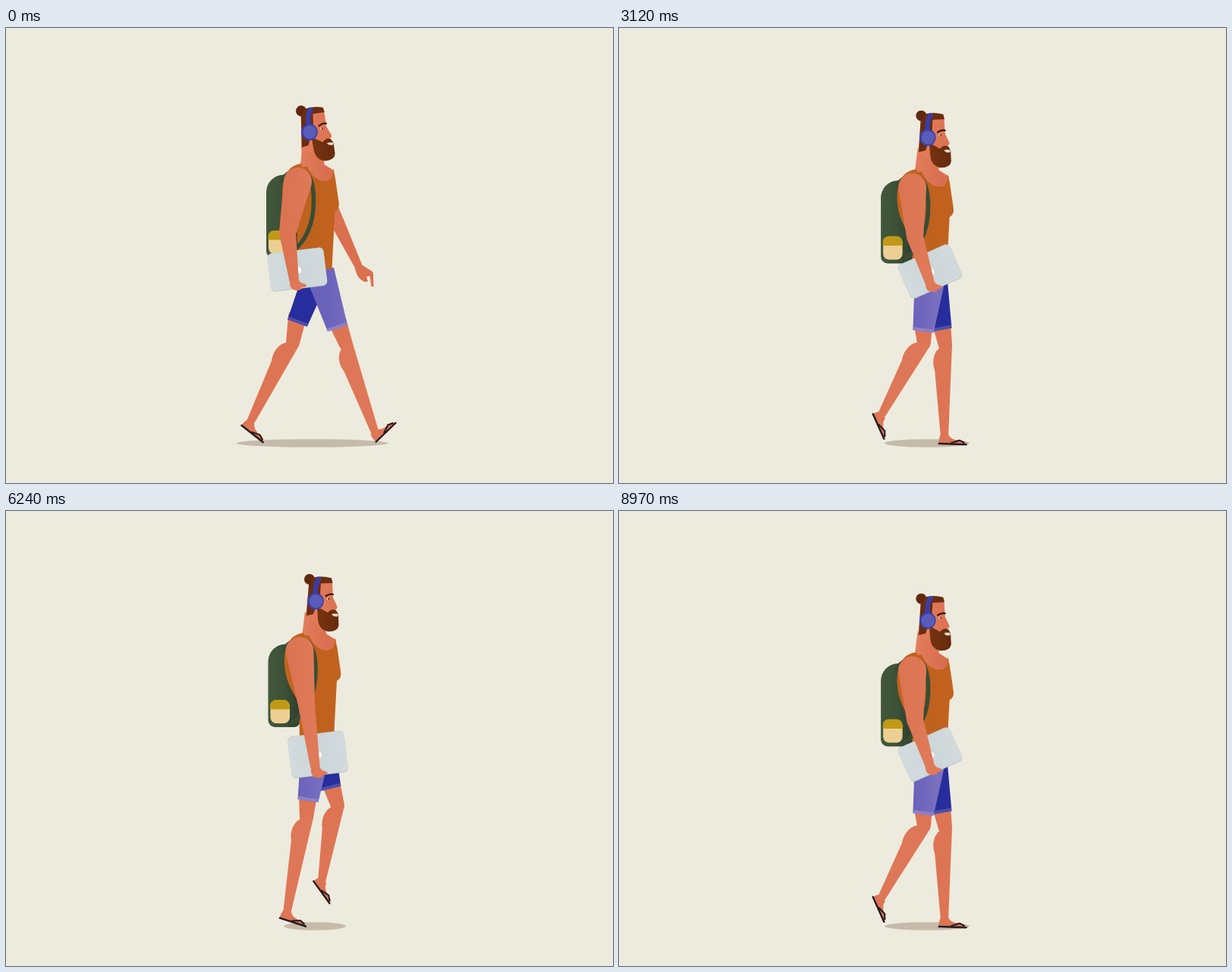
Write an HTML page with a canvas that moves like this. It is 800 px wide and 600 px high and loops after 9000 ms.

```html
<!DOCTYPE html>
<html lang="en">
<head>
<meta charset="utf-8">
<title>Walk cycle</title>
<style>
html, body { margin: 0; width: 100%; height: 100%; overflow: hidden; background: #edebde; }
canvas { display: block; width: 800px; height: 600px; }
</style>
</head>
<body>
<canvas id="stage" width="800" height="600"></canvas>
<script>
const ctx = document.getElementById('stage').getContext('2d');
const LOOP = 9000, FRAME = 30, CYCLE = 1170, STEP = CYCLE / 2;
const SKIN = '#dd7555', FAR_SKIN = '#da7050', HAIR = '#6a2d10', DARK = '#231b20';

// time, body drop, forward lean, shadow radius (repeats every step)
const BODY = [
  [0, 18, 0, 100],
  [180, 25.5, .85, 56],
  [210, 18.5, 1, 43],
  [300, 5, 1.02, 38],
  [390, 0, 1, 41],
  [458, 2, .65, 46],
  [510, 8.5, .3, 72]
];

// time, hem x y, knee x y, ankle x y, foot angle
const LEG = [
  [0, 437, 396, 448, 417, 487, 535, -44],
  [80, 435, 401, 445, 421, 461, 540, -5],
  [180, 425, 398, 430, 418, 429, 540, 2],
  [210, 420, 399, 427, 416, 423, 540, 2],
  [390, 398, 382, 396, 404, 370, 531, 18],
  [458, 394, 377, 388, 404, 353, 530, 23],
  [510, 389, 388, 382, 412, 339, 529, 27],
  [585, 384, 389, 378, 415, 321, 522, 38],
  [765, 401, 400, 402, 415, 345, 512, 66],
  [795, 405, 388, 409, 411, 355, 496, 78],
  [975, 428, 366, 437, 388, 416, 489, 54],
  [1043, 430, 373, 441, 393, 433, 500, 25],
  [1095, 432, 377, 443, 402, 451, 513, 0]
];

// time, elbow x y, wrist x y, laptop x y angle
const NEAR_ARM = [
  [0, 371, 270, 380, 335, 384, 318.5, -7],
  [210, 378, 272, 391, 336, 393, 320, -11],
  [390, 396, 255, 408, 341, 411, 321, -7],
  [510, 398, 265, 417, 340, 417.5, 320, -15],
  [585, 398, 273, 421, 338, 421, 319, -19],
  [765, 390, 275, 410, 337, 410, 321, -24],
  [1043, 384, 258, 385, 338, 390.5, 319, 0]
];

// time, elbow x y, wrist x y, hand angle
const FAR_ARM = [
  [0, 437, 257, 465, 315, 0],
  [210, 426, 275, 437, 318, 0],
  [390, 410, 255, 404, 316, 20],
  [510, 386, 268, 376, 331, 35],
  [585, 380, 278, 365, 330, 38],
  [765, 400, 280, 400, 316, 20],
  [1043, 434, 260, 451, 318, 15]
];

const rad = a => a * Math.PI / 180;

// Smooth periodic curve through timed rows
function sample(rows, period, time) {
  const n = rows.length, t = (time % period + period) % period;
  let i = n - 1;
  while (rows[i][0] > t) i--;
  const row = k => rows[(k + n) % n];
  const at = k => row(k)[0] + Math.floor(k / n) * period;
  const h = at(i + 1) - at(i), u = (t - at(i)) / h;
  const slope = (k, c) => {
    const a = at(k) - at(k - 1), b = at(k + 1) - at(k);
    const left = (row(k)[c] - row(k - 1)[c]) / a;
    const right = (row(k + 1)[c] - row(k)[c]) / b;
    return (left * b + right * a) / (a + b);
  };
  return row(i).slice(1).map((p, j) => {
    const q = row(i + 1)[j + 1];
    const m = slope(i, j + 1) * h, k = slope(i + 1, j + 1) * h;
    const u2 = u * u, u3 = u2 * u;
    return p * (2 * u3 - 3 * u2 + 1) + m * (u3 - 2 * u2 + u) + q * (3 * u2 - 2 * u3) + k * (u3 - u2);
  });
}

function fill(d, color) {
  ctx.fillStyle = color;
  ctx.fill(new Path2D(d));
}

function line(d, color, width) {
  ctx.strokeStyle = color;
  ctx.lineWidth = width;
  ctx.lineCap = ctx.lineJoin = 'round';
  ctx.stroke(new Path2D(d));
}

function oval(x, y, rx, ry, color) {
  ctx.fillStyle = color;
  ctx.beginPath();
  ctx.ellipse(x, y, rx, ry, 0, 0, 7);
  ctx.fill();
}

function box(x, y, w, h, r, color) {
  ctx.fillStyle = color;
  ctx.beginPath();
  ctx.roundRect(x, y, w, h, r);
  ctx.fill();
}

function blend(x0, x1, ...colors) {
  const g = ctx.createLinearGradient(x0, 0, x1, 0);
  colors.forEach((c, i) => g.addColorStop(i / (colors.length - 1), c));
  return g;
}

function placed(x, y, angle, draw) {
  ctx.save();
  ctx.translate(x, y);
  ctx.rotate(rad(angle));
  draw();
  ctx.restore();
}

// Round-ended limb that narrows from r0 to r1
function taper(x0, y0, r0, x1, y1, r1, color) {
  const dir = Math.atan2(y1 - y0, x1 - x0);
  const a = Math.acos((r0 - r1) / Math.hypot(x1 - x0, y1 - y0));
  ctx.fillStyle = color;
  ctx.beginPath();
  ctx.arc(x0, y0, r0, dir + a, dir - a + 2 * Math.PI);
  ctx.arc(x1, y1, r1, dir - a, dir + a);
  ctx.closePath();
  ctx.fill();
}

function foot(x, y, angle) {
  placed(x, y, angle, () => {
    fill('M-5 -4L5 -4Q8 2 17 3L26 4Q29 6 27 8L-7 8Q-8 2 -5 -4Z', SKIN);
    line('M9 7L20 3L26 6', DARK, 2);
    line('M-7 8.2L29 8.2', DARK, 2.4);
  });
}

function leg(time, isFar, dy) {
  let [hx, hy, kx, ky, ax, ay, turn] = sample(LEG, CYCLE, time);
  if (isFar) {
    const q = (time % CYCLE + CYCLE) % CYCLE;
    const kick = Math.exp(-(((q - 458) / 60) ** 2));
    ay -= 8 * kick;
    turn += 18 * kick;
  }
  foot(ax, ay, turn);
  taper(hx, hy - 8, 12, kx, ky, 9, SKIN);

  const len = Math.hypot(ax - kx, ay - ky);
  const shin = Math.atan2(ay - ky, ax - kx) * 180 / Math.PI;
  placed(kx, ky, shin, () => {
    fill(`M0 -9L${len} -5L${len + 3} 0L${len} 5L34 13.5C22 18 8 15 3 6L-3 0Z`,
      isFar ? SKIN : '#de7757');
  });

  const waist = 298 + dy, left = isFar ? 394 : 390;
  const d = Math.hypot(hx - 411, hy - waist);
  const ux = (hx - 411) / d, uy = (hy - waist) / d;
  const hem = (side, back) => `${hx + side * uy - back * ux} ${hy - side * ux - back * uy}`;
  const cloth = isFar ? '#272d9c' : blend(hx - 16, hx + 18, '#6a61ba', '#7067bd', '#7b70bf');
  fill(`M${left} ${waist}L432 ${waist}L${hem(13.7, 0)}L${hem(-13.7, 0)}Z`, cloth);
  fill(`M${hem(13.7, 0)}L${hem(-13.7, 0)}L${hem(-13.7, 4)}L${hem(13.7, 4)}Z`,
    isFar ? '#4c51ae' : '#8b82cb');
}

function farArm(time, dy) {
  const [ex, ey, wx, wy, turn] = sample(FAR_ARM, CYCLE, time);
  taper(412, 192 + dy, 14, ex, ey, 9, FAR_SKIN);
  taper(ex, ey, 9, wx, wy, 5, FAR_SKIN);
  placed(wx, wy, turn, () =>
    fill('M-5 -1L5 -2L16 5Q20 7 19 13L19.5 26L16.5 26L14.5 12L10 13L12 19Q7 21 3 17Q-2 13 -5 3Z', FAR_SKIN));
}

function backpack() {
  box(345.5, 175.5, 42, 109.5, [23, 12, 8, 9], blend(345, 388, '#42583c', '#3c5137', '#2d3d2d'));
  box(348.5, 249.5, 25.5, 30.5, 8, '#ecd093');
  box(348, 249, 26, 12.5, [8, 8, 1, 1], '#c09a17');
}

function torso() {
  fill('M394 133L421 150L422 162L435 170L432 190L400 190L390 166Z', blend(392, 424, '#e27c5b', '#d96f50'));
  fill('M391 161C375 163 366 177 367 202C368 222 376 237 386 252L387 300L432 300L436 224' +
    'Q443 220 441 211L436.5 180L433.5 166C435 178 430 184 422 184C410 183 402 172 399 162Z',
    blend(367, 442, '#c1651e', '#be611d', '#c3621f'));
  line('M366 183C372 173 383 168 392 170C404 173 408 190 408 210C408 240 398 263 378 279', '#384d34', 5.5);
}

function head() {
  fill('M398 110L412 92L430 92L431 114L436.5 126Q437 129 433 131L430 145L413 150L395 140Z',
    blend(396, 436, '#e37d5c', '#dc7353'));
  oval(400, 90, 7, 7, '#5f280f');
  fill('M399 97L405 88Q416 85 429 88.5L430.5 95L415 95.5L414 110L405 136L396 138Z', HAIR);
  fill('M410 126L417 130L424 134Q429 128 435 131L438 136L438.5 151Q437 159 425 159Q412 157 411 142Z',
    blend(410, 439, '#77340f', '#652a0d'));
  fill('M429 136Q434 134.5 438 136L437 139Q432 140 429 136Z', '#f3d4c0');
  line('M421.5 112Q427 108.5 431 110', '#3a1a10', 2.3);
  oval(425, 116, 2.2, 1.4, '#f0cdb9');
  oval(425.6, 116, 1.1, 1.3, '#3a1a10');
  ctx.lineCap = 'butt';
  line('M412 90Q407 97 408 111', '#3a3da6', 6.5);
  oval(408, 119, 10.8, 11, '#3b3fa8');
  oval(408.5, 119, 8.8, 9, '#5a5cb9');
}

function laptop(x, y, angle, dy) {
  const h = 55.5 - .25 * dy;
  placed(x, y, angle, () => {
    box(-37.3, -h / 2, 74.6, h, 6, '#bdc8cb');
    box(-37, -h / 2 + .5, 74, h - 1.5, 6, blend(-37, 37, '#d3dbdd', '#ccd6d9', '#d2dadc'));
    oval(1, 1, 4, 4, '#fafcfc');
  });
}

function nearArm(sx, sy, ex, ey, wx, wy) {
  const tone = blend(sx - 19, sx + 25, '#db7351', '#e07a59');
  taper(sx, sy, 18.5, ex, ey, 11, tone);
  taper(ex, ey, 11, wx, wy, 6, tone);
  placed(wx, wy, 0, () =>
    fill('M-6 -2L6 -2L9 1L15 3Q17 6 13 7L9 7L10 9Q6 12 0 10.5Q-5 9 -6 3Z', '#df7857'));
}

function draw(ms) {
  const raw = ms % CYCLE;
  // the second step starts a little slower
  const lag = raw > STEP ? 20 * Math.sin(Math.PI * (raw - STEP) / STEP) ** 2 : 0;
  const t = raw - lag;
  const [dy, lean, spread] = sample(BODY, STEP, t);
  const dx = 2.5 * (lean - 1);

  ctx.fillStyle = '#edebde';
  ctx.fillRect(0, 0, 800, 600);
  oval(407 - (spread - 41) * .06, 547.5, spread, 5.3, '#c6baab');

  farArm(t, dy);
  leg(t + STEP, true, dy);
  leg(t, false, dy);

  placed(dx, dy, 0, () => {
    backpack();
    torso();
    placed(408, 172, 6 * (lean - 1), () => {
      ctx.translate(-408, -172);
      // upper neck follows the head
      fill('M396 132L393 164L421 164L421 150Z', blend(392, 424, '#e27c5b', '#d96f50'));
      head();
    });
  });

  const [ex, ey, wx, wy, lx, ly, tilt] = sample(NEAR_ARM, CYCLE, t);
  laptop(lx, ly, tilt, dy);
  nearArm(387 + dx, 184.5 + dy, ex, ey, wx, wy);
}

const start = performance.now();
function tick() {
  const ms = Math.max(0, performance.now() - start) % LOOP;
  draw(Math.floor(ms / FRAME) * FRAME);
  requestAnimationFrame(tick);
}
tick();
</script>
</body>
</html>
```
